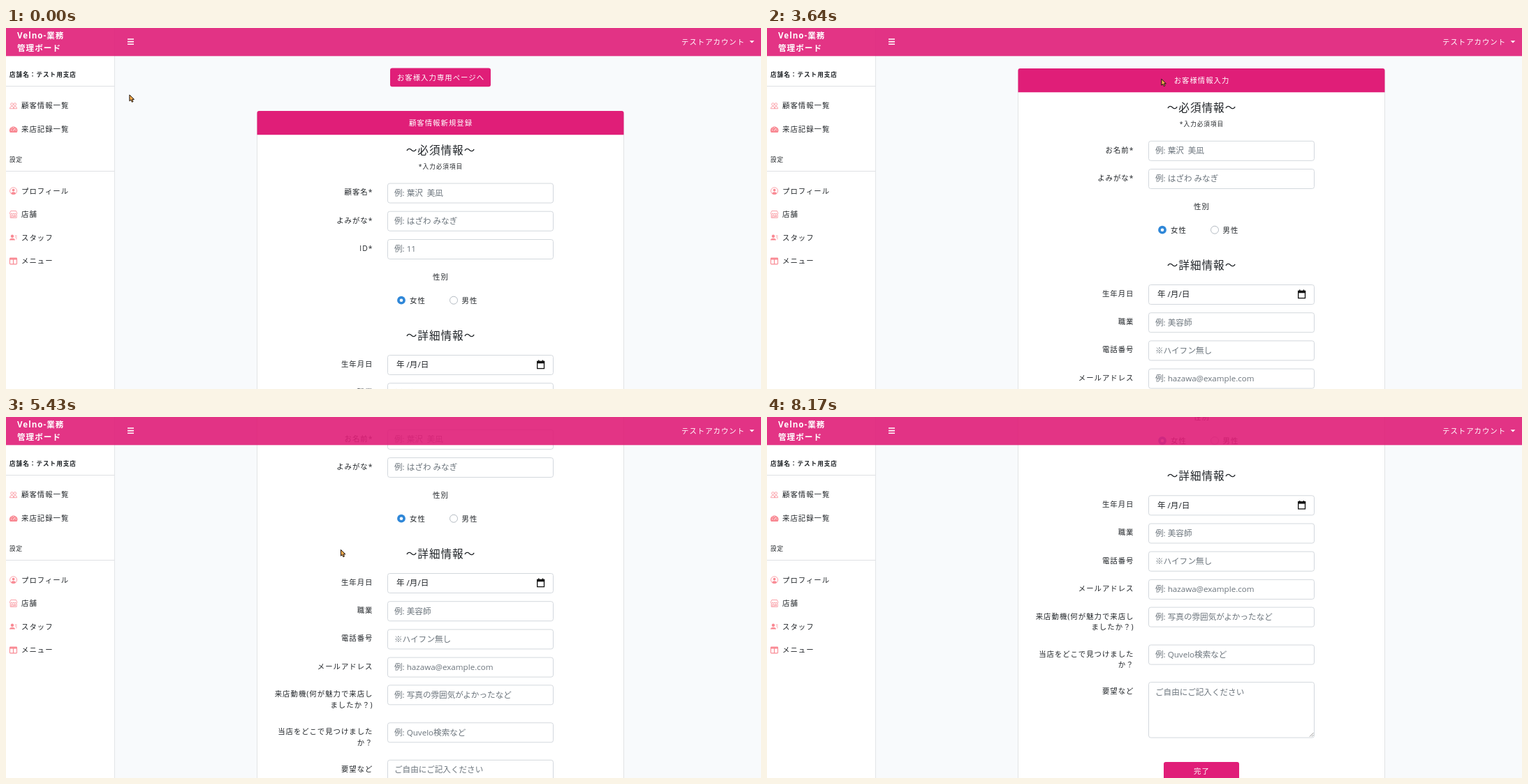
An HTML page for the animation above (8760 ms loop, 1081 px wide and 518 px high).

```html
<!DOCTYPE html>
<html lang="ja">
<head>
<meta charset="utf-8">
<title>管理ボード</title>
<style>
  html, body { margin: 0; width: 100%; height: 100%; overflow: hidden; background: #f8fafc; }
  svg { display: block; }
  text { font-family: 'Open Sans', 'Noto Sans CJK JP', 'Noto Sans CJK', sans-serif; white-space: pre; }
</style>
</head>
<body>
<svg id="stage" width="1081" height="518" viewBox="0 0 1081 518"></svg>
<script>
const LOOP = 8760;
const PINK = '#e01e78', DARK_PINK = '#ca166b', INK = '#212529', GREY = '#6c757d', SALMON = '#f98a94';
const CENTER = 622;
const stage = document.getElementById('stage');

function add(parent, tag, attrs = {}) {
  const node = document.createElementNS('http://www.w3.org/2000/svg', tag);
  for (const key in attrs) node.setAttribute(key, attrs[key]);
  return parent.appendChild(node);
}

const group = parent => add(parent, 'g');

function box(parent, x, y, width, height, fill, more = {}) {
  return add(parent, 'rect', { x, y, width, height, fill, ...more });
}

function path(parent, d, more = {}) {
  return add(parent, 'path', { d, ...more });
}

// cy is the vertical middle of the glyphs
function label(parent, str, x, cy, { size = 10.4, gap = 1, fill = INK, anchor = 'start', weight = 400 } = {}) {
  const node = add(parent, 'text', {
    x, y: cy + size * 0.38, fill, 'font-size': size, 'letter-spacing': gap,
    'text-anchor': anchor, 'font-weight': weight
  });
  node.textContent = str;
  return node;
}

const centered = (parent, str, cy, opts = {}) => label(parent, str, CENTER + 0.5, cy, { anchor: 'middle', ...opts });
const caption = (parent, str, cy) => label(parent, str, 525.5, cy, { anchor: 'end' });

function field(parent, y, hint, height = 28) {
  box(parent, 546.5, y + 0.5, 237, height, '#fff', { rx: 3, stroke: '#ced4da', 'stroke-width': 0.9 });
  label(parent, hint, 556, y + 14, { size: 11.6, gap: 0, fill: GREY });
}

function row(parent, name, y, hint) {
  caption(parent, name, y + 13);
  field(parent, y, hint);
}

function dateRow(parent, y) {
  caption(parent, '生年月日', y + 13);
  field(parent, y, '');
  label(parent, '年 /月/日', 559, y + 14, { size: 11.6, gap: 0 });
  box(parent, 760.7, y + 9.6, 9.8, 10, 'none', { stroke: '#111', 'stroke-width': 1.3 });
  path(parent, `M760 ${y + 8.8}h11.2v3.4h-11.2zM762 ${y + 7.6}h1.5v2h-1.5zM767.7 ${y + 7.6}h1.5v2h-1.5z`, { fill: '#111' });
}

function genderRow(parent, y) {
  centered(parent, '性別', y);
  const cy = y + 33.7;
  add(parent, 'circle', { cx: 566, cy, r: 5.9, fill: '#2f87d8' });
  add(parent, 'circle', { cx: 566, cy, r: 2.3, fill: '#fff' });
  label(parent, '女性', 578, cy);
  add(parent, 'circle', { cx: 641, cy, r: 5.5, fill: '#fff', stroke: '#adb5bd', 'stroke-width': 0.9 });
  label(parent, '男性', 652.5, cy);
}

function card(parent, top, title) {
  box(parent, 359.5, top + 0.5, 525, 900, '#fff', { rx: 3, stroke: '#dfe1e3', 'stroke-width': 0.9 });
  path(parent, `M359.5 ${top + 34.3}V${top + 3}q0-3 3-3H881.5q3 0 3 3V${top + 34.3}z`, { fill: PINK });
  centered(parent, title, top + 17, { fill: '#fff' });
  centered(parent, '～必須情報～', top + 56.5, { size: 15.6 });
  centered(parent, '*入力必須項目', top + 79.5, { size: 8.6 });
}

const heading = (parent, cy) => centered(parent, '～詳細情報～', cy, { size: 15.6 });
const NAME_HINT = '例: 葉沢\u2002美凪', KANA_HINT = '例: はざわ みなぎ', JOB_HINT = '例: 美容師';

function buildRegister() {
  const page = group(stage);
  const ring = box(page, 548.8, 56.4, 146.4, 29, 'none', { rx: 4, stroke: '#efa0c6', 'stroke-width': 2.6 });
  const button = box(page, 550, 57.6, 144, 26.6, PINK, { rx: 3 });
  centered(page, 'お客様入力専用ページへ', 71, { fill: '#fff' });
  card(page, 119, '顧客情報新規登録');
  row(page, '顧客名*', 222.5, NAME_HINT);
  row(page, 'よみがな*', 262.7, KANA_HINT);
  row(page, 'ID*', 303, '例: 11');
  genderRow(page, 357);
  heading(page, 441);
  dateRow(page, 469);
  row(page, '職業', 509.2, JOB_HINT);
  return { page, ring, button };
}

function buildVisitor() {
  const page = group(stage);
  card(page, 58, 'お客様情報入力');
  row(page, 'お名前*', 161.8, NAME_HINT);
  row(page, 'よみがな*', 202, KANA_HINT);
  genderRow(page, 256);
  heading(page, 340);
  dateRow(page, 368);
  row(page, '職業', 408.2, JOB_HINT);
  row(page, '電話番号', 448.4, '※ハイフン無し');
  row(page, 'メールアドレス', 488.6, '例: hazawa@example.com');
  row(page, '来店動機(何が魅力で来店し', 528.3, '例: 写真の雰囲気がよかったなど');
  caption(page, 'ましたか？)', 557);
  row(page, '当店をどこで見つけました', 582.3, '例: Quvelo検索など');
  caption(page, 'か？', 611);
  caption(page, '要望など', 649);
  field(page, 635.8, 'ご自由にご記入ください', 79.5);
  path(page, 'M777 714.3l5.5-5.5M780 714.3l2.5-2.5', { stroke: '#777', 'stroke-width': 0.8 });
  const button = box(page, 568, 750.6, 108, 26.6, PINK, { rx: 3 });
  centered(page, '完了', 764, { fill: '#fff' });
  return { page, button };
}

function buildSidebar() {
  const bar = group(stage);
  box(bar, 0, 0, 155, 518, '#fff');
  box(bar, 155, 0, 1, 518, '#e3e5e8');
  for (const y of [83, 205]) box(bar, 0, y, 155, 1, '#dfe1e4');
  label(bar, '店舗名：テスト用支店', 5, 67, { size: 8.6, weight: 700 });
  label(bar, '設定', 5, 189, { size: 8.6, weight: 500 });
  const items = [['顧客情報一覧', 111.5], ['来店記録一覧', 145], ['プロフィール', 234],
    ['店舗', 267.5], ['スタッフ', 301], ['メニュー', 334.5]];
  for (const [name, y] of items) label(bar, name, 22, y);

  const line = { fill: 'none', stroke: SALMON, 'stroke-width': 0.8 };
  const solid = { fill: SALMON };
  const icon = (y, draw) => draw(add(bar, 'g', { transform: `translate(5 ${y})` }));
  const dot = (g, cx, cy, r, more) => add(g, 'circle', { cx, cy, r, ...more });
  icon(106.5, g => {
    dot(g, 3.5, 3, 1.8, line);
    dot(g, 7.8, 3, 1.8, line);
    path(g, 'M.4 9.2Q.6 6 3.5 6T6 9.2zM6 9.2Q5.6 6 8 6T10.6 9.2z', line);
  });
  icon(140, g => {
    path(g, 'M.8 10A5.7 5.7 0 1 1 10.6 10z', solid);
    path(g, 'M5.2 7.6L8.2 4M2 6.5h1.2M3.2 3.5l.8.8M5.7 2.2v1.2M8.6 6.5h1', { stroke: '#fff', 'stroke-width': 0.9 });
  });
  icon(228.2, g => {
    dot(g, 5.6, 5.6, 5, line);
    dot(g, 5.6, 4.4, 1.9, solid);
    path(g, 'M2 9Q3 7 5.6 7T9.2 9Q7.6 10.6 5.6 10.6T2 9z', solid);
  });
  icon(262, g => {
    path(g, 'M1.8.5h7.6l1.4 3.2q0 1.5-1.3 1.5t-1.3-1.5q0 1.5-1.3 1.5T5.6 3.7q0 1.5-1.3 1.5T3 3.7q0 1.5-1.3 1.5T.4 3.7z', line);
    path(g, 'M1.2 5.4v4.9h9V5.4M2.8 10.2V6.9h2.2v3.3M6.5 6.9h2v1.9h-2z', line);
  });
  icon(295.6, g => {
    dot(g, 4, 3.2, 2.2, solid);
    path(g, 'M0 9Q.2 6.2 4 6.2T8 9z', solid);
    path(g, 'M7.6 2.5h3M8.2 4.6h2.4M9 6.7h1.6', line);
  });
  icon(329.6, g => {
    box(g, 0.5, 0.5, 10, 8.8, 'none', { rx: 0.8, stroke: SALMON, 'stroke-width': 1.1 });
    path(g, 'M.4.4h10.2v2.4H.4zM4.9 2.5h1.2v7H4.9z', solid);
  });
}

function buildTopbar() {
  const bar = group(stage);
  box(bar, 0, 0, 1081, 40.3, PINK, { opacity: 0.9 });
  const white = { fill: '#fff' };
  label(bar, 'Velno-業務', 16, 10.8, { ...white, size: 11.6, weight: 700 });
  label(bar, '管理ボード', 16, 28.8, { ...white, size: 11.6, weight: 700 });
  path(bar, 'M174 15.2h9v1.6h-9zM174 18.8h9v1.6h-9zM174 22.4h9v1.6h-9z', white);
  label(bar, 'テストアカウント', 967, 20, white);
  path(bar, 'M1064.6 18.2h6.8l-3.4 3.4z', white);
}

const register = buildRegister();
const visitor = buildVisitor();
buildSidebar();
buildTopbar();

const pen = { stroke: '#1c1410', 'stroke-width': 1, 'stroke-linejoin': 'round' };
const pointer = group(stage);
const arrow = path(pointer, 'M.4.4V9.3L2.4 7.5 3.9 10.8 5.5 10 4.1 6.9H7z', { fill: '#f3a94c', ...pen });
const hand = path(pointer, 'M-1 1.2Q0-.6 1.1 1.1V4.3L5 5.2Q6.3 5.6 6.1 7.2L5.2 11.8H.6L-2.8 7.6Q-2.6 6.3-1 7.3z', { fill: '#f5b921', ...pen });

// Each move steps along a quadratic curve: start, bend, end
const smooth = p => p * p * (3 - 2 * p);
const moves = [
  { from: 740, to: 1500, steps: 12, curve: [176.5, 95.5, 380, 92, 580.5, 72.5], ease: smooth },
  { from: 3640, to: 4460, steps: 13, curve: [580.5, 72.5, 472, 72, 461, 142] },
  { from: 4520, to: 4730, steps: 4, curve: [461, 142, 468, 162, 479, 175] },
  { from: 4930, to: 5430, steps: 8, curve: [479, 175, 479, 191, 479, 190] },
  { from: 7360, to: 8170, steps: 13, curve: [479, 190, 590, 370, 690, 528] }
];
const scrolls = [
  { from: 5210, to: 5430, start: 0, by: 144, stops: [0, 0.14, 0.55, 0.88, 1] },
  { from: 6290, to: 6570, start: 144, by: 111.7, stops: [0, 0.08, 0.4, 0.76, 0.94, 1] }
];

function stepsDone(t, from, to, steps) {
  const count = Math.floor((t - from + 2) / ((to - from) / (steps - 1))) + 1;
  return Math.max(0, Math.min(steps, count));
}

function pointerAt(t) {
  const move = moves.filter(m => t >= m.from).pop() || moves[0];
  const raw = stepsDone(t, move.from, move.to, move.steps) / move.steps;
  const p = move.ease ? move.ease(raw) : raw, q = 1 - p;
  const [x0, y0, x1, y1, x2, y2] = move.curve;
  return [q * q * x0 + 2 * p * q * x1 + p * p * x2, q * q * y0 + 2 * p * q * y1 + p * p * y2];
}

function scrollAt(t) {
  const s = scrolls.filter(s => t >= s.from).pop();
  return s ? s.start + s.by * s.stops[stepsDone(t, s.from, s.to, s.stops.length - 1)] : 0;
}

const show = (node, on) => node.setAttribute('visibility', on ? 'visible' : 'hidden');

function render(t) {
  const first = t < 2640;
  const scroll = scrollAt(t);
  const [x, y] = pointerAt(t);
  const hover = first ? x > 550 && x < 694 && y > 58 && y < 84 : x > 568 && x < 676 && y > 750.6 - scroll;
  show(register.page, first);
  show(visitor.page, !first);
  visitor.page.setAttribute('transform', `translate(0 ${-scroll})`);
  (first ? register : visitor).button.setAttribute('fill', hover ? DARK_PINK : PINK);
  register.ring.setAttribute('opacity', stepsDone(t, 1960, 2310, 6) / 6);
  show(arrow, !hover);
  show(hand, hover);
  pointer.setAttribute('transform', `translate(${x} ${y})`);
}

const begin = performance.now();
function tick() {
  render((performance.now() - begin) % LOOP);
  requestAnimationFrame(tick);
}
tick();
</script>
</body>
</html>
```
